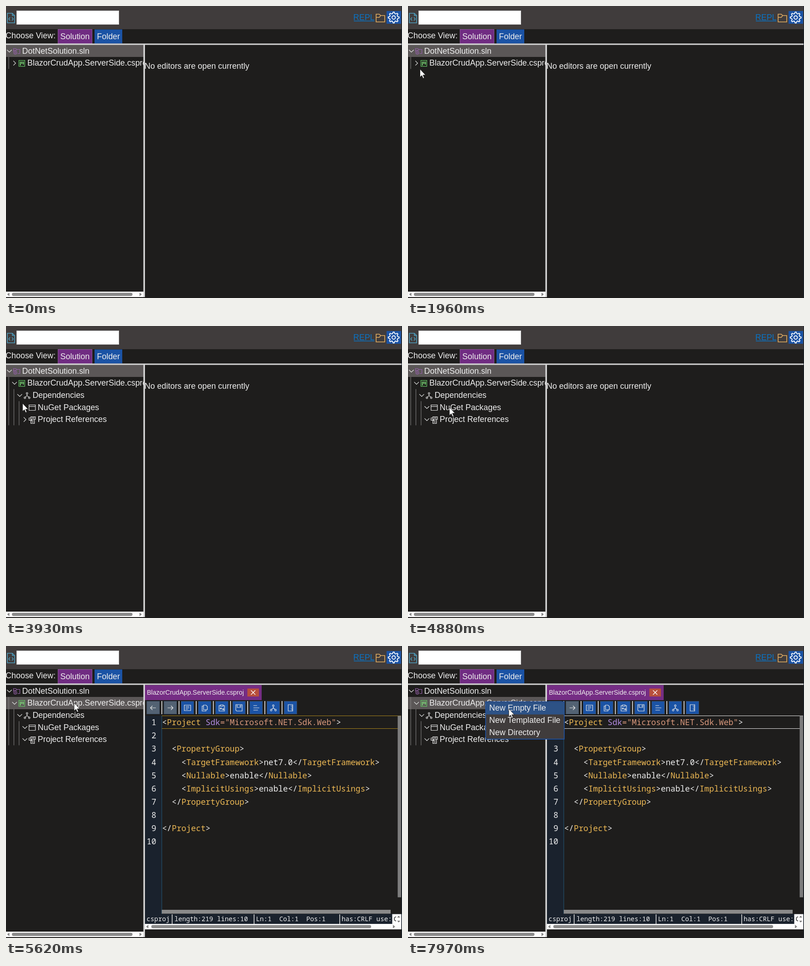
Write an HTML page that moves like this. It is 872 px wide and 642 px high and loops after 8000 ms.

```html
<!DOCTYPE html>
<html lang="en">
<head>
<meta charset="utf-8">
<title>Solution explorer</title>
<style>
  html, body { margin: 0; width: 100%; height: 100%; overflow: hidden; background: #1e1d1c; }
  svg { display: block; }
  text { font: 17.9px "Liberation Sans", Arial, sans-serif; fill: #eee; white-space: pre; }
  .tab { font-size: 14.3px; }
  .code { font: 17.75px "Noto Sans Mono", monospace; }
  .foot { font: 14.2px "Noto Sans Mono", monospace; }
  .tag { fill: #ecb854; }
  .attr { fill: #b18be0; }
  .str { fill: #d8987c; }
  .line { fill: none; stroke: #e8e8e8; stroke-width: 1.2; }
</style>
</head>
<body>
<svg id="stage" width="872" height="642" viewBox="0 0 872 642"></svg>
<script>
const LOOP = 8000;
const BG = '#1e1d1c', BAR = '#403c3c', BLUE = '#1b53a5', PURPLE = '#702c82',
      GREY = '#d4d4d4', NAVY = '#1a222d', SELECT = '#5b5757';
const stage = document.getElementById('stage');

function el(tag, attrs, parent = stage) {
  const node = document.createElementNS('http://www.w3.org/2000/svg', tag);
  for (const key in attrs) node.setAttribute(key, attrs[key]);
  parent.appendChild(node);
  return node;
}
const group = (parent, x = 0, y = 0) => el('g', { transform: `translate(${x} ${y})` }, parent);
const rect = (x, y, width, height, fill, parent, more) =>
  el('rect', { x, y, width, height, fill, ...more }, parent);
const line = (d, parent, more) => el('path', { d, class: 'line', ...more }, parent);
function text(str, x, y, parent, cls = '', more = {}) {
  const node = el('text', { x, y, class: cls, ...more }, parent);
  node.textContent = str;
  return node;
}
const show = (node, on) => node.setAttribute('display', on ? 'inline' : 'none');

function scrollbar(x, y, w, from, to, parent) {
  rect(x, y, w, 12, '#fcfcfc', parent);
  rect(from, y + 2.6, to - from, 6.8, '#8a8a8a', parent, { rx: 3.4 });
  const cy = y + 6, r = x + w - 9;
  el('path', {
    d: `M${x + 2.5} ${cy}l5 -4v8zM${r + 5} ${cy}l-5 -4v8z`, fill: '#858585'
  }, parent);
}

// Icons, each drawn around its own centre
const icons = {
  sln(g) {
    line('M-7 1V-6H-2L0 -4H7V5H2M-7 -2H-1L1 -4', g, { style: 'stroke:#9360a6' });
    el('circle', { cx: -3, cy: 3, r: 3.3, class: 'line', style: 'stroke:#9360a6' }, g);
    el('circle', { cx: -3, cy: 3, r: 1.3, fill: '#9360a6' }, g);
  },
  proj(g) {
    line('M-6.5 -6.5H6.5V6.5H-6.5Z', g, { style: 'stroke:#62c462' });
    line('M-3.3 -4V4.5M0 -4V1M3.4 -4V2.5', g, { style: 'stroke:#7fe07a;stroke-width:2' });
  },
  deps(g) {
    for (const [cx, cy] of [[0, -4.8], [-4.7, 5], [4.9, 5]])
      el('circle', { cx, cy, r: 1.8, class: 'line' }, g);
    line('M0 -3V0L-3.7 3.5M0 0L3.8 3.5', g);
  },
  box(g) { line('M-7 -6H7V6H-7ZM-7 -2.6H7', g); },
  refs(g) {
    line('M-3 -6.5H7V-1H-3ZM-1 -4H5M-3 1V8H5V-1M-1 2H3M-1 5H3M-7 -4V1H-1M-3 -1L-1 1L-3 3M-7 -4H-4', g);
  },
  left(g) { line('M6 0H-6M-1.5 -4.5L-6 0L-1.5 4.5', g); },
  right(g) { line('M-6 0H6M1.5 -4.5L6 0L1.5 4.5', g); },
  form(g) { line('M-7 -6H7V6H-7ZM-4 -3H4M-4 0H4M-4 3H1', g); },
  copy(g) { line('M-2.5 -6H3L6 -3V4H-2.5ZM-2.5 -4H-5.5V7H3V4', g); },
  paste(g) { line('M-3 -5H-6V7H6V-5H3M-3 -6.5H3V-3.5H-3ZM-2 4V0L-4 2M-2 0L0 2M3 0V4.5L1 2.5M3 4.5L5 2.5', g); },
  save(g) { line('M-7 -7H7V7H-5L-7 5ZM-4 -7V-1H4V-7M2 -5V-3', g); },
  lines(g) { line('M-6 -5H2M-6 0H7M-6 5H4', g); },
  ruler(g) { line('M-5 -7H5V7H-5ZM1 -4H5M2 -1H5M1 2H5M2 4.5H5', g); }
};

// Header
rect(0, 0, 872, 642, BG);
rect(0, 0, 871, 51, BAR);
line('M3 16H14L19 21V37H3ZM14 16V21H19M9 25L6 28.5L9 32M13 25L16 28.5L13 32', stage,
  { style: 'stroke:#4f9fbe;stroke-width:1.6' });
rect(23.5, 10.5, 225, 30, '#fff', stage, { stroke: '#c8c8c8' });
text('REPL', 764.8, 31, stage, '', { style: 'fill:#0a73c4' });
rect(766, 32.3, 45.5, 1.4, '#0a73c4');
line('M815 35V18H822L825 21H834V35ZM815 25H822L825 21', stage, { style: 'stroke:#e3ae62;stroke-width:1.6' });
rect(838, 11, 32, 28, BLUE);
let gear = '';
for (let i = 0; i < 32; i++) {
  const r = i % 4 < 2 ? 12 : 8.8, a = (i - 0.5) / 32 * 2 * Math.PI;
  gear += `${i ? 'L' : 'M'}${853.7 + r * Math.cos(a)} ${25.3 + r * Math.sin(a)}`;
}
line(gear + 'Z', stage, { style: 'stroke:#fff;stroke-width:1.8' });
el('circle', { cx: 853.7, cy: 25.3, r: 3.8, class: 'line', style: 'stroke:#fff;stroke-width:1.8' });

text('Choose View:', -0.9, 70.5);
const solution = rect(114.5, 51.5, 75, 31, PURPLE, stage, { stroke: '#8a5496', 'stroke-width': 1 });
text('Solution', 119.6, 72.6);
rect(195, 51.5, 61, 31, BLUE);
text('Folder', 200.3, 72.6);

// Tree
const STEP = 26.67;
const selected = rect(0, 85, 303, 27, SELECT);
const guides = line('', stage, { style: 'stroke:#8b8b8b;stroke-width:1' });
const rows = [
  ['DotNetSolution.sln', 0, 'sln', 0, 0],
  ['BlazorCrudApp.ServerSide.csproj', 1, 'proj', 0, 2380],
  ['Dependencies', 2, 'deps', 2380, 3440],
  ['NuGet Packages', 3, 'box', 3440, 4270],
  ['Project References', 3, 'refs', 3440, 4610]
].map(([name, depth, icon, shown, opened], i) => {
  const x = 7.2 + 11.4 * depth, y = 98.8 + STEP * i;
  const g = group(stage, x, y);
  const arrow = line('', g);
  icons[icon](group(g, 16.3, 0.7));
  text(name, 28.4, 5.9, g);
  return { g, arrow, x, y, shown, opened };
});
scrollbar(0, 628, 303, 13, 278.5);

// Right pane
rect(303, 85, 568, 557, BG);
rect(0, 82.5, 871, 3, GREY);
rect(302.5, 85, 3.5, 555, GREY);
const empty = text('No editors are open currently', 305, 138);

const editor = group(stage);
rect(306, 86, 565, 537, BG, editor);
rect(306, 86, 257, 33, '#752d84', editor);
text('BlazorCrudApp.ServerSide.csproj', 310.2, 107.2, editor, 'tab');
rect(531.5, 93.5, 25.5, 17.5, '#b84f3c', editor);
line('M539.5 97.5L549 107M549 97.5L539.5 107', editor, { style: 'stroke:#fff;stroke-width:1.4' });

['left', 'right', 'form', 'copy', 'paste', 'save', 'lines', 'deps', 'ruler'].forEach((name, i) => {
  const x = 324 + 37.8 * i;
  rect(x - 14, 121.5, 28, 28, i < 2 ? '#536273' : BLUE, editor, { stroke: '#3a4a60', 'stroke-width': 1 });
  if (i) rect(x - 19.5, 121, 1.8, 29, '#e4e4e4', editor);
  icons[name](group(editor, x, 136));
});

rect(306, 153, 37, 436, NAVY, editor);
rect(342.4, 153, 1.2, 436, '#24506a', editor);
const current = line('M343 153.5H870M343 181.5H870', editor);

// Markup: "<" and ">" are plain, tag names, attributes and strings are coloured
const code = [
  '<Project Sdk="Microsoft.NET.Sdk.Web">', '', '  <PropertyGroup>',
  '    <TargetFramework>net7.0</TargetFramework>',
  '    <Nullable>enable</Nullable>',
  '    <ImplicitUsings>enable</ImplicitUsings>',
  '  </PropertyGroup>', '', '</Project>', ''
];
code.forEach((src, i) => {
  const y = 174.2 + 29.1 * i;
  text(String(i + 1), 331, y, editor, 'code', { 'text-anchor': 'end' });
  const node = text('', 343.7, y, editor, 'code');
  const parts = src.match(/<\/?|\w+(?==)|="[^"]*"|\w[\w.]*|[> ]+/g) || [];
  parts.forEach((part, k) => {
    const before = parts[k - 1] || '';
    const cls = part[0] === '=' ? 'str' : before[0] === '<' ? 'tag'
      : (parts[k + 1] || '')[0] === '=' ? 'attr' : '';
    el('tspan', { class: cls }, node).textContent = part;
  });
});
const caret = rect(343.4, 154, 1.6, 27, '#fff', editor);

rect(862.5, 153.5, 7.5, 399, '#7d7d7d', editor);
rect(343, 580, 504, 8.5, '#8a8a8a', editor);
rect(306, 589, 565, 22, NAVY, editor);
[['csproj', 309.6], ['length:219 lines:10', 371], ['Ln:1  Col:1  Pos:1', 550.6], ['has:CRLF use:', 739]]
  .forEach(([str, x]) => text(str, x, 605.4, editor, 'foot'));
for (const x of [365, 545.5, 734]) rect(x, 590, 1.6, 21, '#ddd', editor);
rect(850.5, 589.5, 20, 21.5, '#fff', editor);
const clip = el('clipPath', { id: 'pick' }, el('defs', {}, editor));
rect(850, 589, 9, 22, '#000', clip);
text('C', 853.5, 605.4, editor, 'foot', { style: 'fill:#111', 'clip-path': 'url(#pick)' });
el('path', { d: 'M861.5 597l3.2 -4l3.2 4zM861.5 604l3.2 4l3.2 -4z', fill: '#777' }, editor);
scrollbar(306, 611, 555, 320, 804, editor);
rect(861, 611, 9.5, 12, '#fcfcfc', editor);
rect(871, 0, 1, 642, '#1c2630');

// Context menu
const menu = group(stage);
rect(171, 122.7, 173, 82, BAR, menu, { stroke: '#1d55ab', 'stroke-width': 1.6 });
const hover = rect(172, 124, 171.5, 26.5, '#2d5286', menu);
['New Empty File', 'New Templated File', 'New Directory']
  .forEach((str, i) => text(str, 178.8, 142.4 + STEP * i, menu));

// Pointer shapes, hot spot at the origin
const arrow = el('path', {
  d: 'M0 0V17.6L4 13.9L6.8 20.3L9.3 19.2L6.6 13H12.2Z', fill: '#fff', stroke: '#111', 'stroke-width': 0.8
});
const hand = el('path', {
  d: 'M-1.4 2.2C-1.4 -0.6 2 -0.6 2 2.2V7C3 6 5 6.4 5.2 7.8C6.6 7 8 7.6 8.2 9C9.4 8.6 9.9 9.6 9.9 10.8' +
     'V14.5C9.9 17 8.4 18.4 8.2 21H-0.6C-1.2 18.4 -4 15.4 -5.4 12.6C-5.8 11 -3.6 10.2 -2.6 11.8L-1.4 13Z',
  fill: '#fff', stroke: '#111', 'stroke-width': 0.8
});

// Moves: start, end, target x, target y, ease-out power
const moves = [
  [70, 500, 625, 440, 1.5],
  [630, 1460, 87, 192, 1.8],
  [1480, 2240, 13, 127, 1.7],
  [2390, 2850, 30, 153, 1.6],
  [3440, 4200, 38, 174, 1.6],
  [4270, 4470, 47, 211, 1.5],
  [4580, 4880, 91, 179, 1],
  [4880, 5360, 150, 125, 1.5],
  [6380, 6720, 178, 69, 1.5],
  [6760, 7090, 191, 115, 1.2],
  [7090, 7160, 171, 122, 1],
  [7560, 7950, 222, 138, 1.6]
];
function pointer(t) {
  let x = 788, y = 604;
  for (const [t0, t1, tx, ty, power] of moves) {
    if (t <= t0) break;
    const u = Math.min(1, (t - t0) / (t1 - t0));
    const p = 1 - Math.pow(1 - u, power);
    x += (tx - x) * p;
    y += (ty - y) * p;
  }
  return [x, y];
}

const DOWN = 'M-5 -2.3L0.2 2.7L5.4 -2.3', RIGHT = 'M-2.4 -4.8L2.6 0.2L-2.4 5.2';

function draw(t) {
  const [x, y] = pointer(t);
  let bottom = 85, onArrow = false;
  for (const row of rows) {
    const on = t >= row.shown;
    show(row.g, on);
    row.arrow.setAttribute('d', t >= row.opened ? DOWN : RIGHT);
    if (!on) continue;
    bottom += STEP;
    if (Math.abs(x - row.x) < 6.8 && Math.abs(y - row.y) < 6.8) onArrow = true;
  }
  let d = '';
  [6, 17.4, 28.8].forEach((gx, i) => {
    const top = 112 + STEP * i;
    if (bottom > top + 1) d += `M${gx} ${top}V${bottom}`;
  });
  guides.setAttribute('d', d);
  selected.setAttribute('y', t < 5360 ? 85 : 112);

  const open = t >= 5490, menuOpen = t >= 7220;
  show(empty, !open);
  show(editor, open);
  show(caret, t >= 6080 && (t - 6080) % 1000 < 500);
  current.style.stroke = menuOpen ? '#e6e6e6' : '#a8841c';
  show(menu, menuOpen);
  show(hover, t >= 7350);

  const onButton = x > 114 && x < 190 && y > 51 && y < 83;
  solution.setAttribute('fill', onButton ? '#82409a' : PURPLE);
  const useHand = onArrow || onButton;
  show(arrow, t >= 70 && !useHand);
  show(hand, t >= 70 && useHand);
  const at = `translate(${x} ${y})`;
  arrow.setAttribute('transform', at);
  hand.setAttribute('transform', at);
}

const start = performance.now();
function tick() {
  draw((performance.now() - start) % LOOP);
  requestAnimationFrame(tick);
}
draw(0);
requestAnimationFrame(tick);
</script>
</body>
</html>
```
